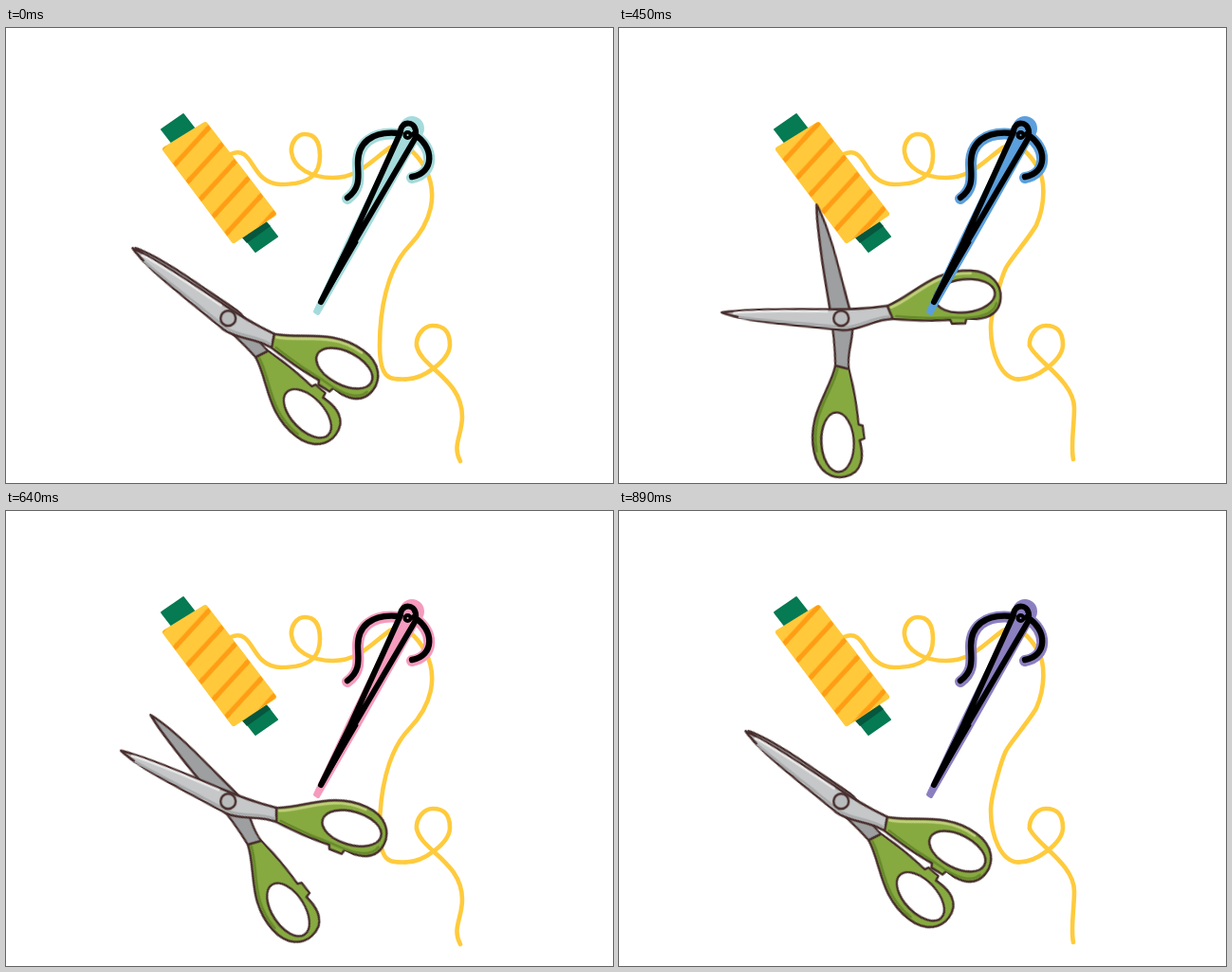
Write an HTML page that moves like this. It is 640 by 480 pixels and loops after 1020 ms.

```html
<!DOCTYPE html>
<html lang="en">
<head>
<meta charset="utf-8">
<title>Sewing kit</title>
<style>
  html, body { margin: 0; width: 100%; height: 100%; overflow: hidden; background: #fff; }
  svg { display: block; width: 100%; height: 100%; }
  path { stroke-linecap: round; stroke-linejoin: round; }

  .front, .back, .pose-a, .pose-b, .tint { animation: 1020ms step-end infinite; }
  .front { animation-name: front; color: #c5c7c8; }
  .back { animation-name: back; color: #9d9fa0; }
  .pose-a { animation-name: pose-a; }
  .pose-b { animation-name: pose-b; }
  .tint { animation-name: tint; }

  /* closed, half, open, half, closed */
  @keyframes front {
    0%, 81.373% { transform: rotate(36.3deg); }
    25.49%, 62.745% { transform: rotate(25.3deg); }
    44.118% { transform: translateX(-1px) rotate(2.8deg); }
  }
  @keyframes back {
    0%, 81.373% { transform: rotate(37.2deg); }
    25.49%, 62.745% { transform: rotate(48deg); }
    44.118% { transform: translateX(-1px) rotate(78.2deg); }
  }
  @keyframes pose-a {
    0%, 50% { visibility: visible; }
    25.49%, 75.49% { visibility: hidden; }
  }
  @keyframes pose-b {
    0%, 50% { visibility: hidden; }
    25.49%, 75.49% { visibility: visible; }
  }
  @keyframes tint {
    0% { color: #a5dbdc; }
    31.373% { color: #5b9fdc; }
    62.745% { color: #f59bbd; }
    87.255% { color: #8c7fc0; }
  }

  .thread { fill: none; stroke: #ffcb3d; stroke-width: 4.6; }
  .ink { stroke: #452b2a; stroke-width: 2.4; }
  .rim { fill: none; stroke-width: 2.6; }
  .halo { fill: none; stroke: currentColor; stroke-width: 12; }
  .black { fill: none; stroke: #000; stroke-width: 6.4; }
</style>
</head>
<body>
<svg viewBox="0 0 640 480">
  <defs>
    <pattern id="stripes-a" width="22.3" height="200" patternUnits="userSpaceOnUse" patternTransform="translate(104 210) rotate(42.5) translate(0 -200)">
      <rect x="7.5" width="5" height="200" fill="#ff9d14"/>
    </pattern>
    <pattern id="stripes-b" href="#stripes-a" patternTransform="translate(100 206) rotate(42.5) translate(0 -200)"/>
    <path id="barrel" d="M168 128 210 102 282 196 240 224Z"/>
    <path id="cap" d="M164 107 187 91 211 122 188 138Z" fill="#057a53" stroke="#057a53" stroke-width="2"/>

    <!-- one scissor half, pivot at the origin, tip to the left -->
    <g id="half" class="ink">
      <path fill="currentColor" d="M-125 0C-95 -6 -50 -7 -10 -9Q20 -10 49 -15.5L55.5 -2C36 -1 22 12 3 12.5C-30 10 -95 10 -125 0Z"/>
      <path fill="#86aa40" d="M49 -15.5C75 -27 95 -57 135 -57C158 -57 168 -43 168 -30C168 -10 150 -5 133 -6.4L132 -1 118 0 116 -4C100 -2 80 -1 55.5 -2Z"/>
      <ellipse rx="32" ry="17.5" fill="#fff" transform="translate(130 -30) rotate(-9)"/>
    </g>

    <path id="tail" d="M414 111C385 108 371 122 371 142C371 155 375 168 360 179"/>
    <path id="hook" d="M430 112C452 125 452 153 428 157"/>
  </defs>

  <g class="thread">
    <path d="M237 133C262 122 257 165 290 165S331 152 331 135S324 112 315 112S300 122 301 131C303 148 322 158 345 158C372 158 385 140 405 126C420 117 434 134 442 148"/>
    <path d="M421 370.5C440 371 468 350 468 334S460 314 450 314S432 325 433 335"/>
    <path class="pose-a" d="M442 148C456 175 449 205 425 230S394 300 394 335S404 371 421 370.5M433 335C437 358 481 370 481 410C481 430 470 440 479 457"/>
    <path class="pose-b" d="M442 148C449 160 450 185 440 208C432 222 412 245 408 253S392 300 392 316C392 345 404 370 421 370.5M433 335C439 351 480 372 480 401C480 420 476 440 479 455"/>
  </g>

  <g stroke-linejoin="round">
    <use href="#cap"/>
    <use href="#cap" x="75" y="98"/>
    <path d="M247 219 270 201 279 209 254 227Z" fill="#06573d"/>
    <use href="#barrel" fill="#ffc93b" stroke="#ffc93b" stroke-width="6"/>
    <use class="pose-a" href="#barrel" fill="url(#stripes-a)" stroke="url(#stripes-a)" stroke-width="5"/>
    <use class="pose-b" href="#barrel" fill="url(#stripes-b)" stroke="url(#stripes-b)" stroke-width="5"/>
  </g>

  <g transform="translate(234.2 306.2)">
    <g class="back">
      <g transform="scale(.98 -.98)">
        <use href="#half"/>
        <path class="rim" stroke="#67892b" d="M53 -14C77 -25 97 -54 135 -54"/>
      </g>
    </g>
    <g class="front">
      <use href="#half"/>
      <path class="rim" stroke="#a9abac" d="M-106 4C-70 7 -30 7 3 9.5C20 9 34 -3 52 -4.5"/>
      <path class="rim" stroke="#e9e9e9" d="M-112 0C-85 -4 -50 -5 -14 -6.5"/>
      <path class="rim" stroke="#67892b" d="M59 -5C80 -4 100 -5 118 -6.5Q160 -6 164 -24"/>
      <path class="rim" stroke="#c2cf7c" stroke-width="1.5" d="M53 -14C77 -25 97 -54 135 -54"/>
    </g>
    <circle class="ink" r="8" fill="#b9bbbc"/>
  </g>

  <g class="tint">
    <circle cx="428" cy="106" r="13" fill="currentColor"/>
    <use class="halo" href="#tail" y="1"/>
    <use class="halo" href="#hook" y="1"/>
    <path d="M417 110 433 118 371 228 329 301 326 299 360 226Z" fill="currentColor" stroke="currentColor" stroke-width="4"/>
  </g>
  <g class="black">
    <use href="#tail"/>
    <use href="#hook"/>
    <path d="M416 110C415 98 434 96 432 113L431 117 367 226 332 289 363 226Z" stroke-width="6"/>
    <path d="M362 226 370 226 333 289Z" fill="#000" stroke-width="3"/>
    <circle cx="423.5" cy="113" r="2" stroke-width="6"/>
  </g>
</svg>
</body>
</html>
```
